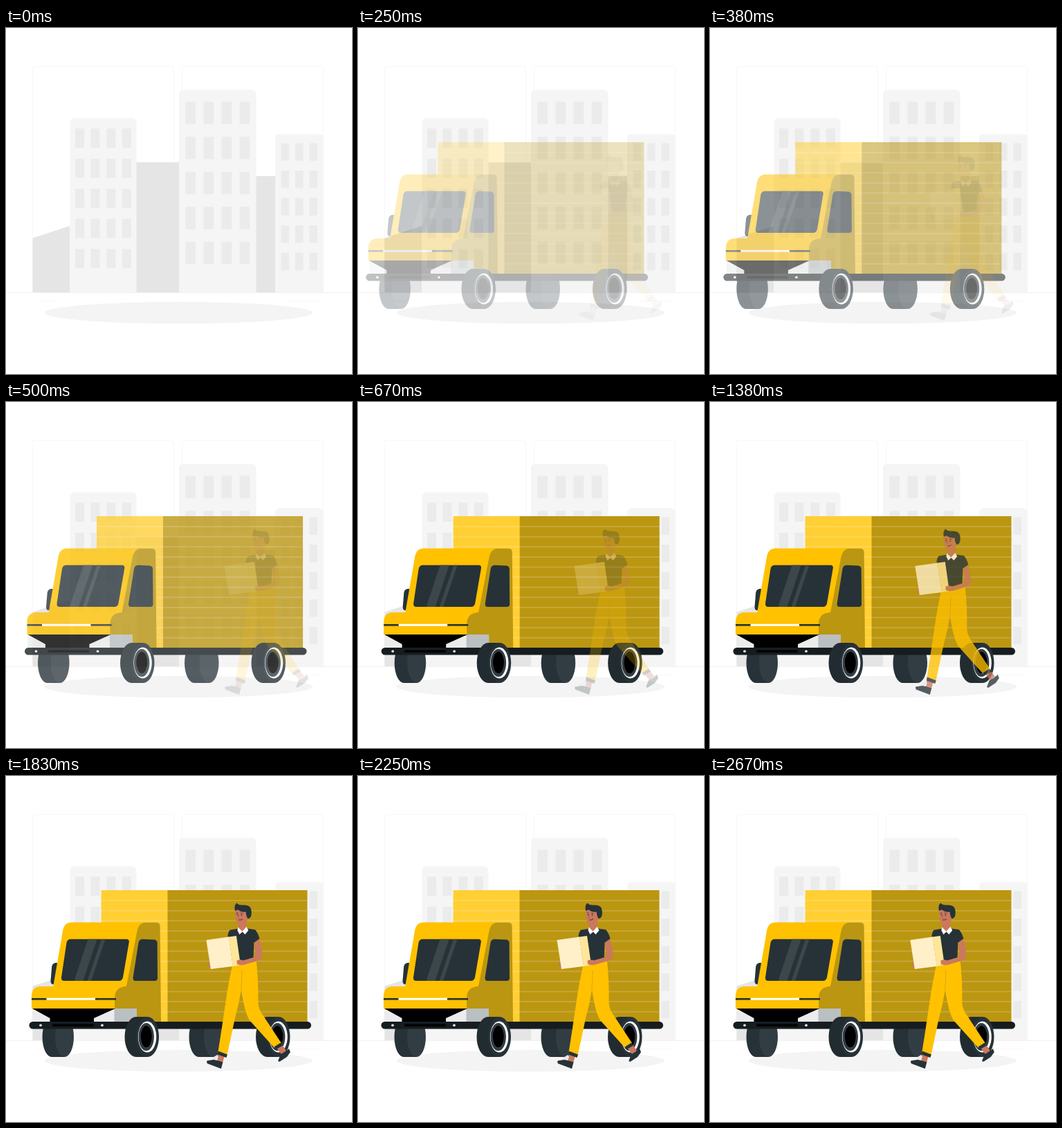
Recreate the animation shown at these times as an HTML page with a canvas. Size 500 px wide and 500 px high, loop 2710 ms.

```html
<!DOCTYPE html>
<html lang="en">
<head>
<meta charset="utf-8">
<title>Delivery</title>
<style>
  html, body { margin: 0; width: 100%; height: 100%; overflow: hidden; background: #fff; }
  canvas { display: block; width: 500px; height: 500px; }
</style>
</head>
<body>
<canvas id="stage" width="500" height="500"></canvas>
<script>
const LOOP = 2710;
const FRAMES = 65;
const STEP = LOOP / FRAMES;
const SLIDE = 30;

const YELLOW = '#ffc100';
const YELLOW_LIGHT = '#ffcf34';
const YELLOW_DARK = '#bb9611';
const INK = '#263238';
const INK_DARK = '#161d20';
const SKIN = '#cb785e';

const stage = document.getElementById('stage').getContext('2d');
const layerCanvas = document.createElement('canvas');
layerCanvas.width = layerCanvas.height = 500;
const layer = layerCanvas.getContext('2d');

function shape(c, color, d) {
  c.fillStyle = color;
  c.fill(new Path2D(d));
}

function line(c, color, width, d) {
  c.strokeStyle = color;
  c.lineWidth = width;
  c.stroke(new Path2D(d));
}

function box(c, color, x, y, w, h, radius = 0) {
  c.fillStyle = color;
  c.beginPath();
  c.roundRect(x, y, w, h, radius);
  c.fill();
}

function oval(c, color, x, y, rx, ry = rx) {
  c.fillStyle = color;
  c.beginPath();
  c.ellipse(x, y, rx, ry, 0, 0, Math.PI * 2);
  c.fill();
}

// Eased progress on cubic-bezier(.36, -.01, .5, 1.38), which overshoots.
function overshoot(x) {
  if (x >= 1) return 1;
  const bezier = (t, a, b) => 3 * (1 - t) ** 2 * t * a + 3 * (1 - t) * t * t * b + t ** 3;
  let low = 0, high = 1;
  for (let i = 0; i < 24; i++) {
    const mid = (low + high) / 2;
    if (bezier(mid, .36, .5) < x) low = mid; else high = mid;
  }
  return bezier(low, -.01, 1.38);
}

function building(c, b) {
  box(c, '#f5f5f5', b.x, b.y, b.w, 382 - b.y, [6, 6, 0, 0]);
  for (let row = 0; row < 5; row++) {
    for (let col = 0; col < b.cols; col++) {
      box(c, '#ebebeb', b.winX + col * b.stepX, b.winY + row * b.stepY, b.winW, b.winH);
    }
  }
}

function drawCity(c) {
  c.strokeStyle = '#f7f7f7';
  c.lineWidth = 1;
  for (const x of [38.5, 254.5]) {
    c.beginPath();
    c.roundRect(x, 55.5, 204, 327, 4);
    c.stroke();
  }
  line(c, '#f1f1f1', 1, 'M0 382.5H500');
  line(c, '#f8f8f8', 1, 'M45 394.5H70M405 394.5H457');

  shape(c, '#e5e5e5', 'M38.5 303.5L92.5 286V382H38.5Z');
  box(c, '#e5e5e5', 188, 194, 63, 188);
  box(c, '#e5e5e5', 361, 214, 29, 168);

  building(c, { x: 92.5, y: 130.5, w: 96, cols: 4, winX: 100, winY: 145.3, winW: 13, winH: 27.7, stepX: 22.6, stepY: 43.5 });
  building(c, { x: 250, y: 89.5, w: 111.5, cols: 4, winX: 259.3, winY: 106.6, winW: 14.7, winH: 32.3, stepX: 26.1, stepY: 50.6 });
  building(c, { x: 389, y: 153.3, w: 70, cols: 3, winX: 397.6, winY: 166.5, winW: 11.6, winH: 25.3, stepX: 20.4, stepY: 39.6 });
  oval(c, '#f4f4f4', 249.5, 411.5, 194, 15.8);
}

function tyre(c, tread, face, x, width, rx) {
  const right = x + width - rx;
  oval(c, tread, x + rx, 377, rx, 29);
  box(c, tread, x + rx, 348, width - 2 * rx, 58);
  oval(c, face, right, 377, rx, 29);
}

function wheel(c, x) {
  tyre(c, '#212b30', '#273238', x, 49.5, 16.5);
  oval(c, '#fff', x + 32.6, 377, 13.2, 22.5);
  oval(c, '#303c42', x + 31.2, 377, 11.2, 20);
  oval(c, '#000', x + 31.3, 376.5, 8, 15.5);
}

function drawTruck(c) {
  tyre(c, INK, '#323d43', 52.5, 45.5, 13.5);
  tyre(c, INK, '#323d43', 264.5, 49.5, 14);

  // Cargo box
  box(c, YELLOW_LIGHT, 137.5, 165, 97, 190);
  box(c, YELLOW_DARK, 233.5, 165, 202, 190);
  for (let i = 1; i < 13; i++) {
    const y = 165.5 + i * 14.6;
    box(c, 'rgba(255,255,255,.16)', 137.5, y - 1, 298, 2);
  }

  // Cab
  shape(c, INK, 'M75 270H71Q66 271 66 278L64.5 296Q64.5 301 68 301L72 299Z');
  shape(c, YELLOW_DARK, 'M190 211.8H218Q222.5 212 222.6 217L224 355H189V336H156V304H173Z');
  shape(c, YELLOW, 'M68 305L82 224Q84 211.5 95 211.5H202Q192 212 189.5 224L174 304Z');
  shape(c, YELLOW, 'M37 336V318Q37 304 51 304H174Q157 305 157 321V336Z');
  box(c, '#ececec', 38, 336, 119, 19);
  box(c, '#babfc1', 156.5, 336, 32.5, 19);
  shape(c, '#000', 'M38 336H158L127 350V355H63.5V350Z');
  box(c, INK, 37, 321, 22, 2.6);
  box(c, '#fff', 58.5, 320.8, 71, 3);
  box(c, INK, 129, 321, 30, 2.6);

  // Windows
  shape(c, INK, 'M93 235.8H174Q178.5 236 177.8 240L169 291Q168 296 163 296H84Q79.5 296 80 291L87.5 241Q88.5 236 93 235.8Z');
  shape(c, '#3c474c', 'M118.5 235.8H131.5L111.5 296H98.5ZM138 235.8H143.5L123 296H117.5Z');
  shape(c, INK, 'M197 235.8L214 236.5Q218.5 237 218.6 241L219 292Q219 296 215 296H187Q183 296 183.6 291L191.5 241Q192.5 236 197 235.8Z');

  // Chassis
  box(c, INK_DARK, 33.5, 355, 407.5, 10.5, 5.2);
  box(c, '#000', 67, 358.5, 60, 3.6, 1.8);
  oval(c, '#fff', 50, 360.3, 1.8);
  oval(c, '#fff', 139, 360.3, 1.8);
  wheel(c, 171.5);
  wheel(c, 361);
}

function drawCourier(c) {
  // Feet
  shape(c, SKIN, 'M307 401L316 404L313 415L304 412Z');
  shape(c, '#e9e9e9', 'M299 407L305 403L307 406L305 412L297 411Z');
  shape(c, INK, 'M290.5 411.5L300 410L305 411L313.5 413.5L311 423L291 415.5Q289.5 413 290.5 411.5Z');
  shape(c, SKIN, 'M391 393L399 388L405 397L398 402Z');
  shape(c, INK, 'M397 402L403 399L409 394L411 399L406 406L396 412.5Q393 413.5 393.5 411Z');

  // Trousers
  shape(c, YELLOW, 'M328 270Q345 264 362 268Q365 296 364.5 325Q364.5 335 369 342L398 386L388 393L352 353Q345 342 340 309Q337 329 331 350L319.5 404L306.5 399Q312 365 317 330Q322 295 328 270Z');
  line(c, '#d6a309', .8, 'M341 281Q341 298 339.8 310');
  shape(c, INK, 'M307 397.5L320 402.5L318.5 407L306 402.5Z');
  shape(c, INK, 'M387.5 391.5L397 385.5L400 389.5L390.5 395Z');

  // Torso
  shape(c, INK, 'M324 222.5L336 220.5L349 220.5L360 222Q364 226 366.5 235L358.5 241L357.5 266Q345 269 333 267L331 236L320.5 232Q321 225 324 222.5Z');
  shape(c, SKIN, 'M337 208H348L347.5 219L341.5 226L335.5 219Z');
  shape(c, '#fff', 'M335.5 218.5L341.5 224.5L347.5 218L350.5 223L345.5 229L341.8 225L337.5 229L334.5 223Z');

  // Head
  shape(c, SKIN, 'M331.5 193Q330.5 203 333 210Q335 215 341 213.5Q350 211 351 203L349 191Z');
  shape(c, INK, 'M331 195Q329.5 186 333.5 183.5Q336 187 342 186.5Q351 186 353.5 190.5Q356 197 354 203Q352.5 206 349.5 206Q346.5 201 347 196.5Q339 197 336 193.5Q333 193 331 195Z');
  oval(c, INK, 334.7, 200.5, .8, 1);
  oval(c, INK, 340.5, 201, .8, 1);
  line(c, INK, .8, 'M333 198.2L335.5 197.6M339 198L342.5 198.6');
  line(c, '#a85a45', .8, 'M336.5 201L335.5 205L337 205.3');
  line(c, '#4b2c28', 1, 'M336.5 208Q339.5 208.6 342 206.6');

  // Parcel
  shape(c, SKIN, 'M292 270L297 268V279L293.5 276Z');
  shape(c, '#fff0c9', 'M289.5 237L322 232.6L328 275L296 279Z');
  shape(c, '#ffe69b', 'M322 232.6L333 231L339 273L328 275Z');

  // Forearm
  shape(c, SKIN, 'M358.5 241L366.5 236L370.5 256Q371.5 264 364 267L345 272.5Q338 274 334 272L333.5 267Q337 264.5 343 266.5L360 261.5Q361 251 358.5 241Z');
}

function slideIn(offset, opacity, draw) {
  layer.setTransform(1, 0, 0, 1, 0, 0);
  layer.clearRect(0, 0, 500, 500);
  layer.translate(offset, 0);
  draw(layer);
  stage.globalAlpha = Math.min(1, Math.max(0, opacity));
  stage.drawImage(layerCanvas, 0, 0);
  stage.globalAlpha = 1;
}

function render(now) {
  // Stepped at 24 pictures per second, each posed at the middle of its step.
  const step = Math.floor(((now + 5) % LOOP) / STEP);
  const time = (step + .5) * STEP;
  const truck = overshoot(time / 1000);
  const courier = overshoot(time / LOOP);

  stage.fillStyle = '#fff';
  stage.fillRect(0, 0, 500, 500);
  drawCity(stage);
  slideIn(-SLIDE * (1 - truck), truck, drawTruck);
  slideIn(SLIDE * (1 - courier), courier, drawCourier);
}

let start;
function tick(now) {
  start ??= now;
  render(now - start);
  requestAnimationFrame(tick);
}
render(0);
requestAnimationFrame(tick);
</script>
</body>
</html>
```
